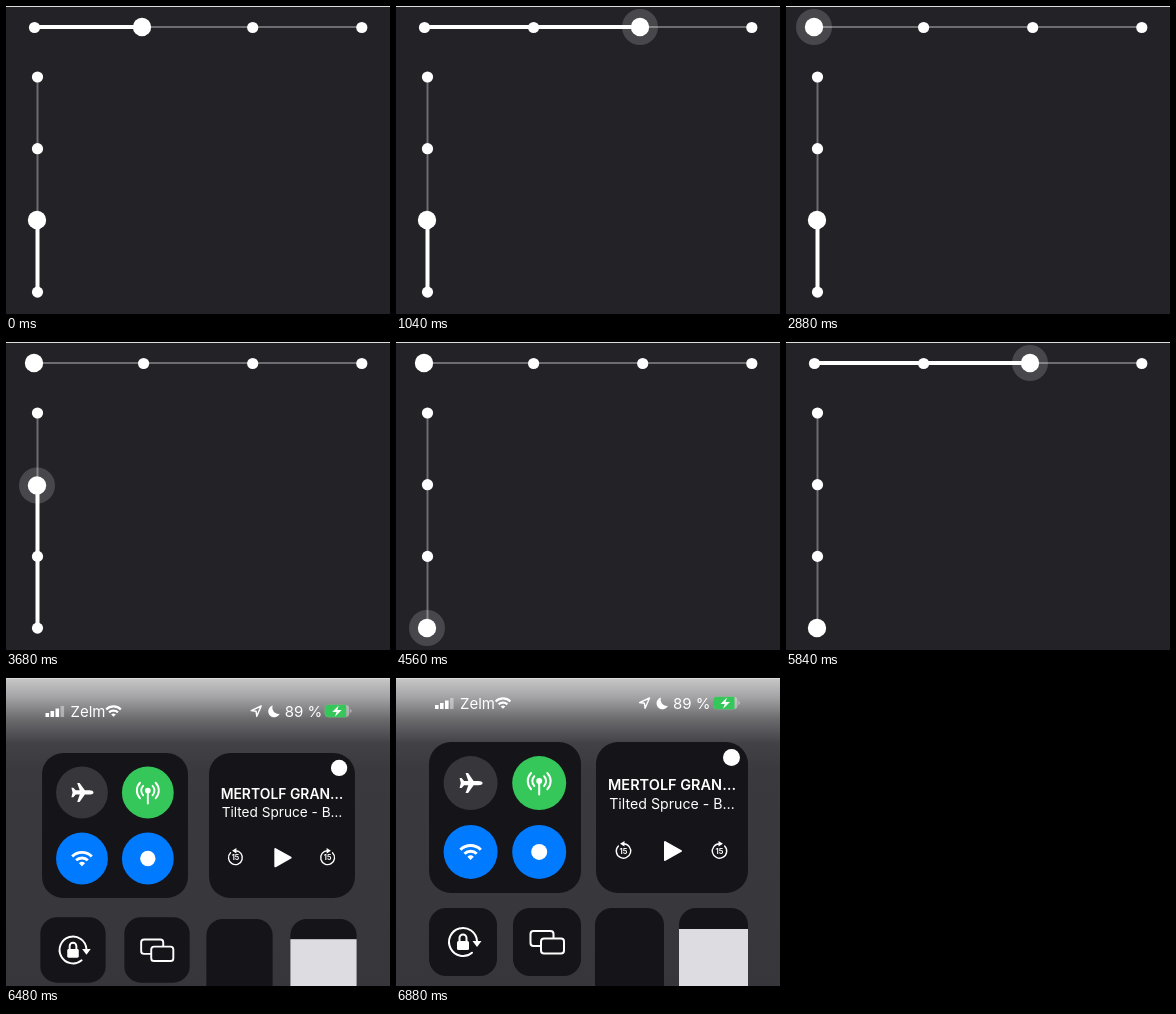
Recreate the animation shown at these times as an HTML page. Size 384 px wide and 308 px high, loop 6.96 s.

```html
<!DOCTYPE html>
<html lang="en">
<head>
<meta charset="utf-8">
<title>Sliders</title>
<style>
  html, body { margin: 0; width: 100%; height: 100%; overflow: hidden; background: #232227; }
  svg { display: block; width: 384px; height: 308px; font-family: Inter, Roboto, sans-serif; fill: #fff; }
  .track { fill: #6d6c71; }
  .halo { fill: #fff; fill-opacity: .17; }
  .line { fill: none; stroke: #fff; stroke-width: 2; stroke-linecap: round; stroke-linejoin: round; }
  .box { fill: #151419; }
  .blue { fill: #007aff; }
  .mid { text-anchor: middle; }
</style>
</head>
<body>
<svg viewBox="0 0 384 308">
  <defs>
    <linearGradient id="shade" x2="0" y2="1">
      <stop offset="0" stop-color="#c6c6c7"/>
      <stop offset=".06" stop-color="#a3a2a4"/>
      <stop offset=".13" stop-color="#6b6a6d"/>
      <stop offset=".21" stop-color="#424146"/>
      <stop offset=".3" stop-color="#3a393e"/>
      <stop offset="1" stop-color="#37363b"/>
    </linearGradient>
    <g id="wifi">
      <path d="M0 8L-3.2 4.8Q0 2 3.2 4.8Z"/>
      <path d="M-10.2-2.2A14.5 14.5 0 0 1 10.2-2.2M-6.1 1.9A8.7 8.7 0 0 1 6.1 1.9" fill="none" stroke="#fff" stroke-width="3"/>
    </g>
    <g id="skip">
      <path class="line" style="stroke-width:1.4" d="M-5.1-5.1A7.2 7.2 0 1 0 0-7.2"/>
      <path d="M-3.5-7.2L1-10V-4.4Z"/>
    </g>
  </defs>

  <rect width="384" height="308" fill="#232227"/>

  <g id="sliders">
    <rect class="track" x="28" y="20" width="328" height="2"/>
    <rect class="track" x="30.5" y="71" width="2" height="215"/>
    <circle class="halo" id="haloH" r="18"/>
    <circle class="halo" id="haloV" r="18"/>
    <rect id="fillH" x="28" y="19" height="4"/>
    <rect id="fillV" x="29.5" width="4"/>
    <g id="dots"></g>
    <circle id="thumbH" r="9.2"/>
    <circle id="thumbV" r="9.2"/>
  </g>

  <g id="panel">
    <rect y="1" width="384" height="307" fill="url(#shade)"/>

    <g id="left" font-size="15">
      <path d="M39 27h3.6v4H39zM44 25h3.6v6H44zM49 22.5h3.6V31H49z"/>
      <path d="M54 20h3.6v11H54z" opacity=".4"/>
      <text x="64" y="30.5">Zelm</text>
      <use href="#wifi" transform="translate(107 25) scale(.72)"/>
    </g>

    <g id="right" font-size="15">
      <path class="line" style="stroke-width:1.4" d="M253.5 20L243.5 24.6L248.4 25.3L249.1 30.3Z"/>
      <path d="M265 19.5A6 6 0 1 0 272 27.8A6.3 6.3 0 0 1 265 19.5Z"/>
      <text x="277" y="30.5">89 %</text>
      <rect x="317" y="18.7" width="24.5" height="12.6" rx="4" opacity=".4"/>
      <path d="M321 18.7H338.5V31.3H321A4 4 0 0 1 317 27.3V22.7A4 4 0 0 1 321 18.7Z" fill="#35c759"/>
      <path d="M342.5 23A2.2 2.2 0 0 1 342.5 27Z" opacity=".5"/>
      <path d="M331 19.5L324.5 26H328.8L327.2 30.7L334 24H329.6Z"/>
    </g>

    <g class="card" data-x="109" data-y="139.5">
      <rect class="box" x="-76" y="-75.5" width="152" height="151" rx="22"/>
      <g transform="translate(-34.4 -34.4)">
        <circle r="27" fill="#37363b"/>
        <path d="M12 0C12 1.5 10 2.2 8 2.2H3L-2.5 10H-5L-2.3 2.2H-6.5L-9 5H-11L-9.8 0L-11-5H-9L-6.5-2.2H-2.3L-5-10H-2.5L3-2.2H8C10-2.2 12-1.5 12 0Z"/>
      </g>
      <g transform="translate(34.2 -34.4)">
        <circle r="27" fill="#35c759"/>
        <circle cy="-2" r="3"/>
        <path class="line" d="M0-2V11.5M-4.9-6.9A7 7 0 0 0-4.9 2.9M4.9-6.9A7 7 0 0 1 4.9 2.9M-8.1-10.1A11.5 11.5 0 0 0-8.1 6.1M8.1-10.1A11.5 11.5 0 0 1 8.1 6.1"/>
      </g>
      <g transform="translate(-34.4 34.4)">
        <circle class="blue" r="27"/>
        <use href="#wifi"/>
      </g>
      <g transform="translate(34.2 34.4)">
        <circle class="blue" r="27"/>
        <circle r="8"/>
      </g>
    </g>

    <g class="card" data-x="276" data-y="139.5">
      <rect class="box" x="-76" y="-75.5" width="152" height="151" rx="22"/>
      <circle cx="59.5" cy="-60" r="8.5"/>
      <text class="mid" y="-27.5" font-size="14.5" font-weight="600">MERTOLF GRAN…</text>
      <text class="mid" y="-8.5" font-size="14.2">Tilted Spruce - B…</text>
      <path class="line" style="fill:#fff" d="M-7 24.5L9 33.5L-7 42.5Z"/>
      <g class="mid" font-size="7.5" font-weight="700">
        <use href="#skip" transform="translate(-48.5 33.5)"/>
        <text x="-48.5" y="36.2">15</text>
        <use href="#skip" transform="translate(47.5 33.5) scale(-1 1)"/>
        <text x="47.5" y="36.2">15</text>
      </g>
    </g>

    <g class="card" data-x="67" data-y="264">
      <rect class="box" x="-34" y="-34" width="68" height="68" rx="17"/>
      <path class="line" d="M9 10.7A14 14 0 1 1 14-1"/>
      <path d="M9.5-1H18.5L14 5Z"/>
      <rect x="-6" y="-1" width="12" height="9" rx="1.5"/>
      <path class="line" d="M-3.5-1V-4A3.5 3.5 0 0 1 3.5-4V-1"/>
    </g>

    <g class="card" data-x="151" data-y="264">
      <rect class="box" x="-34" y="-34" width="68" height="68" rx="17"/>
      <rect class="line" x="-16.5" y="-11" width="23" height="15" rx="3"/>
      <rect class="line" style="fill:#151419" x="-6" y="-3.5" width="23" height="15" rx="3"/>
    </g>

    <g class="card" data-x="233.5" data-y="306">
      <rect class="box" x="-34.5" y="-76" width="69" height="152" rx="17"/>
    </g>

    <g class="card" data-x="317.5" data-y="306">
      <rect class="box" x="-34.5" y="-76" width="69" height="152" rx="17"/>
      <rect x="-34.5" y="-55" width="69" height="131" fill="#dddce1"/>
    </g>
  </g>

  <rect width="384" height="1" fill="#dcdcdc"/>
</svg>

<script>
  const LOOP = 6960, STEP = 80, OPEN = 6240;
  const $ = id => document.getElementById(id);
  const cards = [...document.querySelectorAll('.card')];

  // [time, thumb position]
  const moveH = [[0, 136], [1040, 244], [1440, 355], [1760, 244], [2320, 136], [2880, 28], [5440, 136], [5840, 244]];
  const moveV = [[0, 214], [3680, 143.5], [3920, 71], [4240, 143.5], [4320, 214], [4560, 286]];
  // [pressed, released]
  const pressH = [[640, 3120], [5200, 6080]];
  const pressV = [[3520, 4800]];

  const at = (moves, t) => moves.filter(m => m[0] <= t).pop()[1];
  const pressed = (spans, t) => spans.some(([a, b]) => t >= a && t < b);

  function set(el, attrs) {
    for (const name in attrs) el.setAttribute(name, attrs[name]);
  }

  function addDot(cx, cy) {
    const dot = document.createElementNS('http://www.w3.org/2000/svg', 'circle');
    set(dot, { cx, cy, r: 5.6 });
    $('dots').append(dot);
  }
  for (let i = 0; i < 4; i++) {
    addDot(28.5 + i * 109.1, 21.5);
    addDot(31.5, 71 + i * 71.7);
  }

  function placeThumb(axis, cx, cy, on) {
    set($('thumb' + axis), { cx, cy });
    set($('halo' + axis), { cx, cy, visibility: on ? 'visible' : 'hidden' });
  }

  function drawPanel(t) {
    const k = (t - OPEN) / STEP;
    const open = k >= 0;
    $('panel').style.display = open ? '' : 'none';
    $('sliders').style.filter = open ? `blur(${2 * (k + 1)}px)` : '';
    if (!open) return;
    const rest = ((8 - k) / 5) ** 2;
    const dy = 8 * rest, scale = 1 - .04 * rest;
    $('panel').style.opacity = Math.min(1, (k + 1) / 4);
    set($('left'), { transform: `translate(${.5 * rest} ${dy})` });
    set($('right'), { transform: `translate(${1.7 * rest} ${dy})` });
    for (const card of cards) {
      const { x, y } = card.dataset;
      set(card, { transform: `translate(${x} ${+y + dy}) scale(${scale})` });
    }
  }

  function draw(now) {
    const t = Math.floor((now % LOOP) / STEP) * STEP;
    const x = at(moveH, t), y = at(moveV, t);
    placeThumb('H', x, 21, pressed(pressH, t));
    placeThumb('V', 31, y, pressed(pressV, t));
    set($('fillH'), { width: x - 28 });
    set($('fillV'), { y, height: 286 - y });
    drawPanel(t);
  }

  const start = performance.now();
  function tick() {
    draw(performance.now() - start);
    requestAnimationFrame(tick);
  }
  tick();
</script>
</body>
</html>
```
